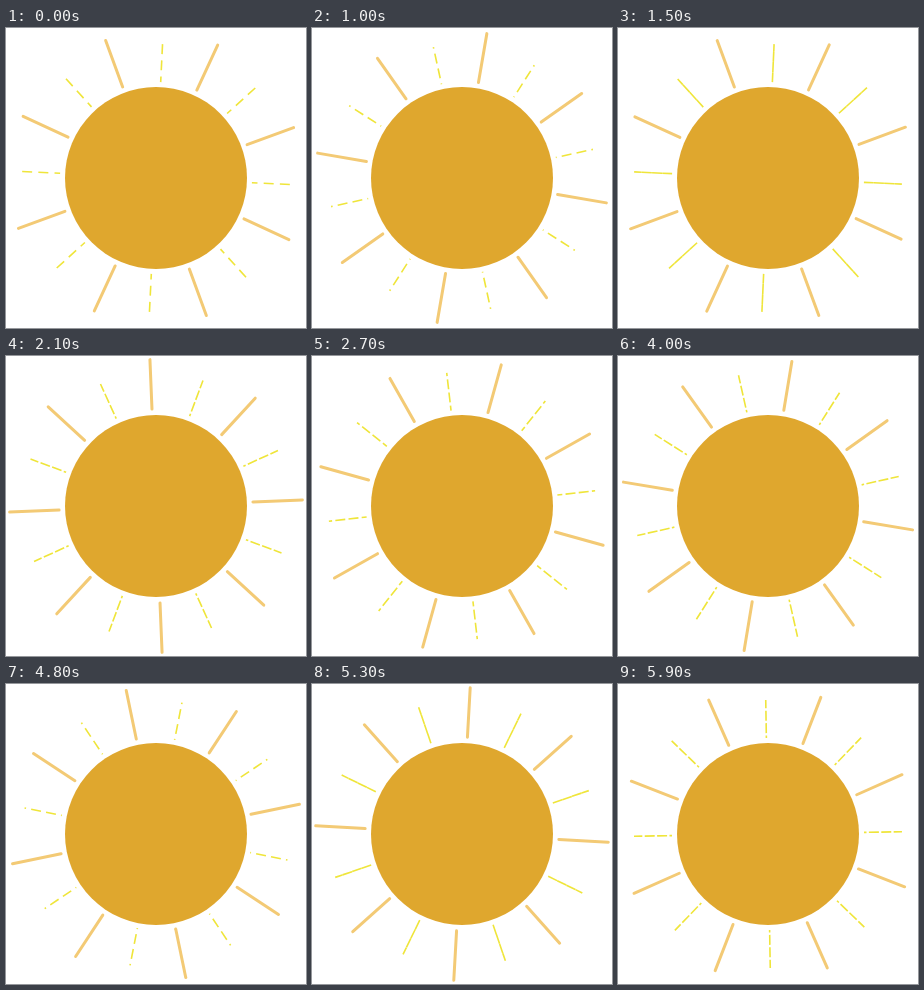
An HTML page for the animation above (6 s loop, 300x300 px).

```html
<!DOCTYPE html>
<html lang="en">
<head>
<meta charset="utf-8">
<title>Sun</title>
<style>
  html, body { margin: 0; width: 100%; height: 100%; overflow: hidden; background: #fff; }
  svg { display: block; width: 100vw; height: 100vh; }
  .long { stroke: #f3ca75; stroke-width: 3; stroke-linecap: round; }
  .dashed { stroke: #efe53a; stroke-width: 1.6; }
</style>
</head>
<body>
<svg viewBox="-150 -150 300 300">
  <g id="rays"></g>
  <circle r="91" fill="#dfa72e"/>
</svg>
<script>
const LOOP = 6000, STEP = 100;
const rays = document.getElementById('rays');

function addRay(kind, angle, outer, inner) {
  const line = document.createElementNS('http://www.w3.org/2000/svg', 'line');
  line.setAttribute('class', kind);
  line.setAttribute('y1', -outer);
  line.setAttribute('y2', -inner);
  line.setAttribute('transform', `rotate(${angle})`);
  rays.append(line);
}

for (let angle = 0; angle < 360; angle += 45) {
  addRay('long', angle, 146.5, 97);
  addRay('dashed', angle + 22.9, 134, 96);
}

function draw(ms) {
  const t = Math.floor(ms % LOOP / STEP) * STEP / 1000;
  rays.setAttribute('transform', `rotate(${24.9 + 29.87 * t})`);
  // The gaps close and reopen while the dashes march outwards.
  const gap = 6.2 * (1 - Math.abs(Math.sin(Math.PI * t / 0.95)));
  rays.style.strokeDasharray = 'none';
  for (const line of rays.querySelectorAll('.dashed')) {
    line.style.strokeDasharray = gap < 0.1 ? 'none' : `10 ${gap}`;
    line.style.strokeDashoffset = t % 1.9 / 1.9 * 16;
  }
}

const start = performance.now();
function tick() {
  draw(performance.now() - start);
  requestAnimationFrame(tick);
}
tick();
</script>
</body>
</html>
```
